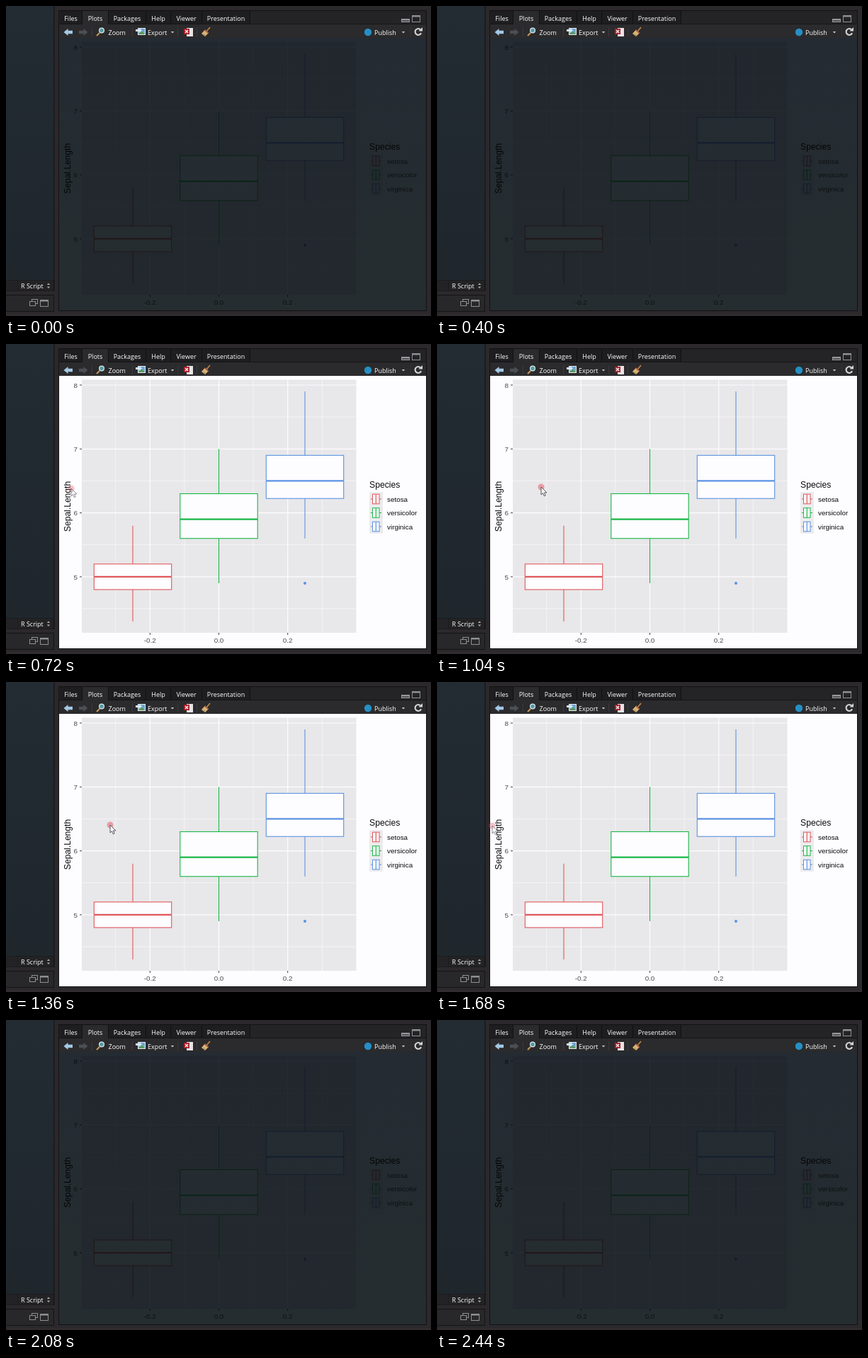
An HTML page with a canvas for the animation above (2.48 s loop, 600x438 px).

```html
<!DOCTYPE html>
<html lang="en">
<head>
<meta charset="utf-8">
<title>Plots pane</title>
<style>
html, body { margin: 0; width: 100%; height: 100%; overflow: hidden; background: #1e1d1f; }
canvas { display: block; width: 600px; height: 438px; }
</style>
</head>
<body>
<canvas id="stage" width="600" height="438"></canvas>
<script>
const ctx = document.getElementById('stage').getContext('2d');
const LOOP = 2480, STEP = 40;
const UI = '"Open Sans", "Noto Sans", sans-serif';
const PLOT = '"Liberation Sans", Arial, sans-serif';

// Pointer stops: time, x, y
const path = [
  [520, 3, 207], [560, 41, 207], [640, 65, 206], [680, 76, 205],
  [720, 92, 204], [800, 115, 203], [880, 132, 202], [960, 142, 202],
  [1040, 147, 202], [1480, 147, 202], [1560, 143, 202], [1600, 134, 203],
  [1640, 112, 203], [1680, 78, 203], [1720, 4, 188]
];

const species = [
  { name: 'setosa', color: '#e0575b', at: -0.25, stats: [4.3, 4.8, 5, 5.2, 5.8] },
  { name: 'versicolor', color: '#18b846', at: 0, stats: [4.9, 5.6, 5.9, 6.3, 7] },
  { name: 'virginica', color: '#5b92e3', at: 0.25, stats: [5.6, 6.225, 6.5, 6.9, 7.9], outlier: 4.9 }
];

const sx = v => 300.5 + v * 486;
const sy = v => 58 + (8 - v) * 90.3;

function rect(x, y, w, h, fill) {
  ctx.fillStyle = fill;
  ctx.fillRect(x, y, w, h);
}

function frame(x, y, w, h, color, width = 1) {
  ctx.strokeStyle = color;
  ctx.lineWidth = width;
  ctx.strokeRect(x, y, w, h);
}

function line(x1, y1, x2, y2, color, width = 1) {
  ctx.strokeStyle = color;
  ctx.lineWidth = width;
  ctx.beginPath();
  ctx.moveTo(x1, y1);
  ctx.lineTo(x2, y2);
  ctx.stroke();
}

function shape(points, fill, stroke, width = 1) {
  ctx.beginPath();
  points.forEach(([x, y]) => ctx.lineTo(x, y));
  ctx.closePath();
  if (fill) { ctx.fillStyle = fill; ctx.fill(); }
  if (stroke) { ctx.strokeStyle = stroke; ctx.lineWidth = width; ctx.stroke(); }
}

function disc(x, y, r, fill) {
  ctx.fillStyle = fill;
  ctx.beginPath();
  ctx.arc(x, y, r, 0, Math.PI * 2);
  ctx.fill();
}

function text(str, x, y, size, color, family = UI, align = 'left') {
  ctx.font = `${size}px ${family}`;
  ctx.fillStyle = color;
  ctx.textAlign = align;
  ctx.fillText(str, x, y);
}

function shade(y1, y2, top, bottom) {
  const g = ctx.createLinearGradient(0, y1, 0, y2);
  g.addColorStop(0, top);
  g.addColorStop(1, bottom);
  return g;
}

function caret(x, y) {
  shape([[x - 2.2, y - 1], [x + 2.2, y - 1], [x, y + 1.5]], '#c9c9c9');
}

function maximize(x, y) {
  frame(x + 0.5, y + 0.5, 11, 9, '#8e9092');
  rect(x, y, 12, 2.5, '#8e9092');
}

function leftPanes() {
  rect(0, 0, 68, 388, shade(0, 388, '#232b33', '#1f272d'));
  rect(0, 387, 68, 16, '#1b1a1c');
  rect(0, 388, 16, 14, '#232224');
  rect(17, 388, 50, 14, '#232224');
  text('R Script', 21, 398.5, 9, '#fff');
  shape([[57.8, 394], [62.2, 394], [60, 391.5]], '#aaa');
  shape([[57.8, 396.5], [62.2, 396.5], [60, 399]], '#aaa');
  line(68, 0, 68, 403, '#111012', 1);
  rect(0, 408, 68, 24, '#141315');
  rect(0, 409, 67, 22, '#282729');
  frame(36.5, 414.5, 8, 6, '#8e9092');
  rect(33, 417, 9, 8, '#282729');
  frame(33.5, 417.5, 8, 6, '#8e9092');
  maximize(48, 415);
}

function arrow(x, y, dir, color) {
  const p = [[-6.5, 0], [-0.5, -5], [-0.5, -2.3], [6, -2.3], [6, 2.3], [-0.5, 2.3], [-0.5, 5]];
  shape(p.map(([dx, dy]) => [x + dx * dir, y + dy]), color);
}

function toolbar() {
  arrow(88, 37, 1, '#a4c8e5');
  arrow(109, 37, -1, '#4b4f54');
  for (const x of [121.5, 178.5, 242.5, 269.5]) line(x, 30, x, 43, '#3b393c');

  line(128, 42, 132, 38, '#c99a5b', 2);
  disc(135, 34.5, 4, '#dcebf2');
  disc(135, 34.5, 2.8, '#559aa0');
  text('Zoom', 144.5, 40.5, 9, '#fff');

  rect(186, 31, 11, 10, '#e8edf0');
  rect(187, 32, 9, 8, '#6ba6d2');
  shape([[187, 40], [191, 35], [196, 40]], '#5b9956');
  shape([[183, 33], [188, 33], [188, 31], [192, 34.5], [188, 38], [188, 36], [183, 36]], '#d7e8f5');
  text('Export', 200, 40.5, 9, '#fff');
  caret(235, 37);

  rect(255, 31, 9, 12, '#e7e4e5');
  rect(251, 32, 8, 8, '#a81f2b');
  line(253, 34, 257, 38, '#fff', 1.3);
  line(257, 34, 253, 38, '#fff', 1.3);

  line(283, 36, 288, 30, '#b98043', 1.8);
  shape([[281, 33.5], [286, 38], [281, 43], [276, 39]], '#d8b575');
  line(280.5, 34, 285.5, 38.5, '#b65c48', 1.5);
  line(279, 39, 281, 42, '#987444', 0.8);

  disc(511, 37, 5.2, '#258fc4');
  text('Publish', 520, 40.5, 9, '#fff');
  caret(561, 37);
  line(571.5, 30, 571.5, 43, '#343235');

  ctx.strokeStyle = '#d4d5d8';
  ctx.lineWidth = 2.2;
  ctx.beginPath();
  ctx.arc(582, 36.5, 4.4, 0.4, Math.PI * 1.75);
  ctx.stroke();
  shape([[582.5, 35.5], [588, 35.5], [588, 30]], '#d4d5d8');
}

function rightPane() {
  rect(74, 6, 520, 425, '#121113');
  rect(75, 7, 518, 423, '#242325');
  rect(75, 26, 518, 19, '#2b2a2c');
  const tabs = [['Files', 76], ['Plots', 108], ['Packages', 145], ['Help', 198],
    ['Viewer', 233], ['Presentation', 277], ['', 345]];
  line(75, 25.5, 593, 25.5, '#151416');
  tabs.slice(0, -1).forEach(([name, x], i) => {
    const end = tabs[i + 1][1], active = name === 'Plots';
    rect(x, 7, end - x - 1, active ? 20 : 18, active ? '#2b2a2c' : '#1e1d1f');
    line(end - 0.5, 7, end - 0.5, 25, '#111012');
    text(name, (x + end - 1) / 2, 20.5, 9, '#fff', UI, 'center');
  });
  rect(558, 18, 12, 5, '#96989a');
  rect(559, 20, 10, 2, '#55565a');
  maximize(573, 13);
  toolbar();
}

function boxplot({ color, at, stats, outlier }) {
  const [low, q1, median, q3, high] = stats.map(sy);
  const x = sx(at), half = 54.7;
  line(x, low, x, q1, color, 1.1);
  line(x, q3, x, high, color, 1.1);
  rect(x - half, q3, half * 2, q1 - q3, '#fdfcff');
  frame(x - half, q3, half * 2, q1 - q3, color, 1.1);
  line(x - half, median, x + half, median, color, 2.2);
  if (outlier) disc(x, sy(outlier), 2, color);
}

function legendKey({ name, color }, i) {
  const y = 219 + i * 19.5;
  rect(513, y - 9.7, 19, 19.4, '#ebeaec');
  line(515, y, 517.5, y, color);
  line(527, y, 530, y, color);
  rect(517.5, y - 6.8, 9.5, 13.6, '#fdfcff');
  frame(517.5, y - 6.8, 9.5, 13.6, color);
  line(522.3, y - 6.8, 522.3, y + 6.8, color, 1.2);
  text(name, 538, y + 3.8, 9.9, '#0c0c0c', PLOT);
}

function plot(lit) {
  ctx.save();
  ctx.beginPath();
  ctx.rect(75, 45, 518, 385);
  ctx.clip();
  if (!lit) {
    rect(75, 45, 518, 385, shade(45, 430, '#242b32', '#252d30'));
    ctx.globalCompositeOperation = 'multiply';
  } else {
    rect(75, 45, 518, 385, '#fdfcff');
  }
  drawChart(lit);
  ctx.restore();
}

// On the dark pane the chart multiplies into the background, so white ink
// would vanish; the panel is built from tiles between the grid lines instead.
function drawChart(lit) {
  const grid = (values, scale) => values.map(([v, w]) => [scale(v), w]);
  const cols = grid([[-0.3, 0.6], [-0.2, 1.2], [-0.1, 0.6], [0, 1.2], [0.1, 0.6], [0.2, 1.2], [0.3, 0.6]], sx);
  const rows = grid([[8, 1.2], [7.5, 0.6], [7, 1.2], [6.5, 0.6], [6, 1.2], [5.5, 0.6], [5, 1.2], [4.5, 0.6]], sy);
  if (lit) {
    rect(107, 50.5, 387.5, 357.5, '#e8e7e9');
    cols.forEach(([x, w]) => line(x, 50.5, x, 408, '#fdfcff', w));
    rows.forEach(([y, w]) => line(107, y, 494.5, y, '#fdfcff', w));
  } else {
    ctx.save();
    ctx.beginPath();
    ctx.rect(107, 50.5, 387.5, 357.5);
    species.forEach(({ at, stats }) =>
      ctx.rect(sx(at) - 54.7, sy(stats[3]), 109.4, sy(stats[1]) - sy(stats[3])));
    ctx.clip('evenodd');
    const spans = (lines, start, end) => {
      const edges = [start, ...lines.flatMap(([p, w]) => [p - w / 2, p + w / 2]), end];
      return edges.filter((_, i) => i % 2 === 0).map((a, i) => [a, edges[i * 2 + 1] - a]);
    };
    for (const [x, w] of spans(cols, 107, 494.5))
      for (const [y, h] of spans(rows, 50.5, 408)) rect(x, y, w, h, '#ebe3eb');
    ctx.restore();
  }

  for (const v of [5, 6, 7, 8]) {
    line(104, sy(v), 107, sy(v), '#444');
    text(v, 101, sy(v) + 3.7, 9.9, '#4d4d4d', PLOT, 'right');
  }
  for (const v of [-0.2, 0, 0.2]) {
    line(sx(v), 408, sx(v), 411, '#444');
    text(v.toFixed(1), sx(v), 421.5, 9.9, '#4d4d4d', PLOT, 'center');
  }

  ctx.save();
  ctx.translate(90.5, 229.5);
  ctx.rotate(-Math.PI / 2);
  text('Sepal.Length', 0, 0, 12.1, '#0c0c0c', PLOT, 'center');
  ctx.restore();
  text('Species', 513, 202.5, 12.2, '#0c0c0c', PLOT);

  ctx.globalAlpha = lit ? 1 : 0.75;
  species.forEach(boxplot);
  species.forEach(legendKey);
}

function pointerAt(t) {
  const next = path.findIndex(p => p[0] >= t);
  if (t < path[0][0] || next < 0) return null;
  const b = path[next], a = path[Math.max(0, next - 1)];
  const k = a === b ? 0 : (t - a[0]) / (b[0] - a[0]);
  return [a[1] + (b[1] - a[1]) * k, a[2] + (b[2] - a[2]) * k];
}

function pointer([x, y], lit) {
  ctx.save();
  if (x < 68) {
    line(x, y - 5, x, y + 5, '#c3c7ca');
    line(x - 2.5, y - 5, x + 2.5, y - 5, '#c3c7ca');
    line(x - 2.5, y + 5, x + 2.5, y + 5, '#c3c7ca');
  } else {
    ctx.globalAlpha = x < 120 ? 0.65 : 1;
    disc(x, y, lit ? 4.5 : 3.5, lit ? 'rgba(232, 105, 120, .6)' : 'rgba(190, 25, 40, .65)');
    const outline = [[0, 0], [0, 11], [2.5, 8.7], [4.3, 12.8], [6.2, 12], [4.5, 8], [8, 8]];
    const [fill, edge] = lit ? ['#f4f2f4', '#4c4a4d'] : ['#63686d', '#a3a6aa'];
    shape(outline.map(([dx, dy]) => [x + dx, y + dy]), fill, edge, 0.9);
  }
  ctx.restore();
}

function draw(now) {
  const t = Math.floor((now % LOOP) / STEP) * STEP;
  const lit = t >= 720 && t < 1720;
  rect(0, 0, 600, 438, '#2b292c');
  leftPanes();
  rightPane();
  plot(lit);
  line(0, 436.5, 600, 436.5, '#393033');
  const position = pointerAt(t);
  if (position) pointer(position, lit);
}

let start;
function tick(now) {
  start ??= now;
  draw(Math.max(0, now - start));
  requestAnimationFrame(tick);
}
draw(0);
requestAnimationFrame(tick);
</script>
</body>
</html>
```
